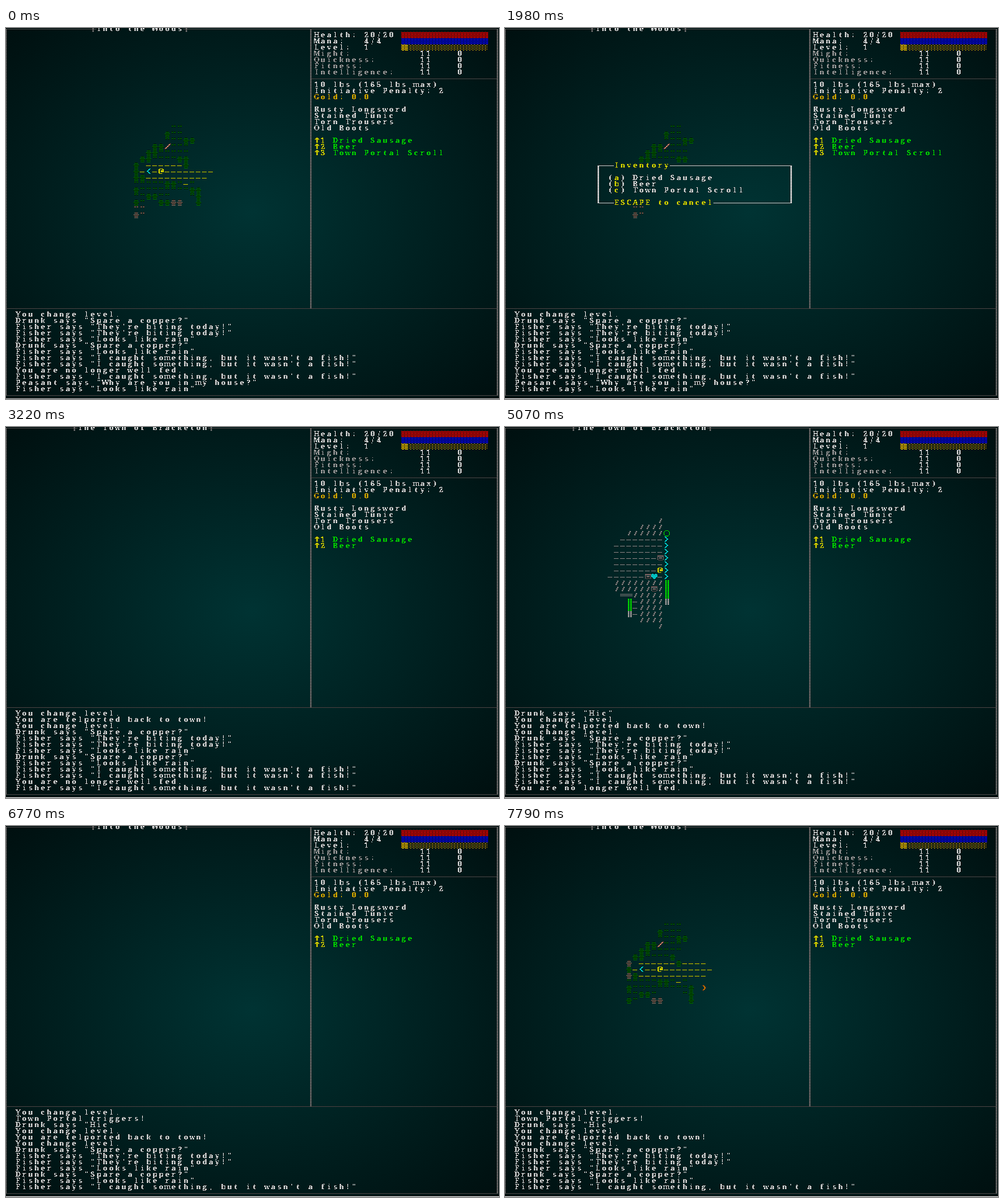
Write an HTML page with a canvas that moves like this. It is 634 px wide and 478 px high and loops after 8000 ms.

```html
<!DOCTYPE html>
<html lang="en">
<head>
<meta charset="utf-8">
<title>Terminal roguelike</title>
<style>
  html, body { margin: 0; width: 100%; height: 100%; overflow: hidden; background: #000f0f; }
  canvas { display: block; width: 634px; height: 478px; }
</style>
</head>
<body>
<canvas id="stage" width="634" height="478"></canvas>
<script>
const W = 634, H = 478, CELL = 8, LOOP = 8000;
const screen = document.getElementById('stage').getContext('2d');
const layer = document.createElement('canvas');
layer.width = W;
layer.height = H;
const ctx = layer.getContext('2d', { willReadFrequently: true });

const WHITE = '#fff', YELLOW = '#ff0', GOLD = '#ffd700', GREEN = '#0f0', CYAN = '#0ff';
const FRAME = '#999', LIGHT = '#ccc', LEAF = '#008000', BROWN = '#8c8078';

const colX = c => 4 + CELL * c;
const rowY = r => 5 + CELL * r;

// Newest message first; each scene starts further up the list.
const caught = 'Fisher says "I caught something, but it wasn\'t a fish!"';
const rain = 'Fisher says "Looks like rain"';
const biting = 'Fisher says "They\'re biting today!"';
const copper = 'Drunk says "Spare a copper?"';
const level = 'You change level.';
const LOG = [
  level, 'Town Portal triggers!', 'Drunk says "Hic"', level,
  'You are telported back to town!', level, copper, biting, biting, rain,
  copper, rain, caught, caught, 'You are no longer well fed.', caught,
  'Peasant says "Why are you in my house?"', rain
];
const ITEMS = ['Dried Sausage', 'Beer', 'Town Portal Scroll'];

const woodsStart = { col: 20, row: 15, tiles: [
  '      ""',
  '     T""',
  '     """TT',
  '   TT/"""',
  '  TT"""""',
  ' TT""""TT',
  'T ------T',
  'T-<-@--------',
  'TT----------',
  '"""""TT"-"',
  'T""""""""TT',
  '""TT""   "T',
  'T"  TTtt  T',
  '\'\'',
  't\''
] };
const woodsBack = { ...woodsStart, tiles: woodsStart.tiles.slice(0, 14) };
const woodsEast = { col: 19, row: 15, tiles: [
  '      """',
  '     T"""',
  '     """TT',
  '   TT/"""',
  '  TT"""""',
  ' TT""""T',
  't ------T----',
  'T-<--@--------',
  'tT-----------',
  '"""""TT"-"',
  'T"""""""""T )',
  '""TT"    "T',
  'T"  tt    T'
] };
const townArrive = { col: 15, row: 14, tiles: [
  '        ;',
  '     ;;;;O',
  '   ......>',
  '  .......>',
  '  .......>',
  '  .....N.>',
  '  .......>',
  ' ........>',
  '.......H@>',
  ' ;;;;;NN;#',
  ' ;;;;;;;;#',
  '  ==;;;;;#',
  '   #.;;;;#',
  '   #.;;;;',
  '   #.;;;;',
  '     ;;;;',
  '        ;'
] };
const townStep = { col: 16, row: 14, tiles: [
  '        ;',
  '     ;;;;',
  '   ;;;;;;O',
  '  .......>',
  ' ........>',
  ' ........>',
  ' .......N>',
  ' ........>',
  ' .......@>',
  '......NH.>',
  ' ;;;;;;;;#',
  ' ;;;;;;N;#',
  '  ==;;;;;#',
  '   #.;;;;%',
  '   #.;;;;',
  '   %.;;;;',
  '     ;;;;',
  '        ;'
] };

const WOODS = 'Into the Woods', TOWN = 'The Town of Bracketon';
const SCENES = [
  { at: 0, title: WOODS, map: woodsStart, log: 5, items: 3, edge: '#999' },
  { at: 200, title: WOODS, map: woodsStart, log: 5, items: 3 },
  { at: 1980, title: WOODS, map: woodsStart, log: 5, items: 3, menu: true },
  { at: 3220, title: TOWN, log: 3, items: 2 },
  { at: 3300, title: TOWN, map: townArrive, log: 3, items: 2 },
  { at: 5070, title: TOWN, map: townStep, log: 2, items: 2 },
  { at: 6770, title: WOODS, log: 0, items: 2 },
  { at: 6850, title: WOODS, map: woodsBack, log: 0, items: 2 },
  { at: 7790, title: WOODS, map: woodsEast, log: 0, items: 2 }
];

function text(c, r, str, color) {
  ctx.fillStyle = color;
  [...str].forEach((ch, i) => ctx.fillText(ch, colX(c + i) + 3.5, rowY(r) + 7));
}

function rects(c, r, color, ...list) {
  ctx.fillStyle = color;
  for (const [x, y, w, h] of list) ctx.fillRect(colX(c) + x, rowY(r) + y, w, h);
}

function clearCells(c, r, w, h) {
  ctx.clearRect(colX(c), rowY(r), w * CELL, h * CELL);
}

function hLine(c0, c1, r, color) {
  rects(c0, r, color, [3, 4, (c1 - c0) * CELL + 2, 1]);
}

function vLine(c, r0, r1, color) {
  rects(c, r0, color, [3, 4, 2, (r1 - r0) * CELL + 1]);
}

function box(c0, r0, c1, r1, color) {
  for (const r of [r0, r1]) hLine(c0, c1, r, color);
  for (const c of [c0, c1]) vLine(c, r0, r1, color);
}

function shade(c, r, n, dense, color) {
  ctx.fillStyle = color;
  for (let y = 0; y < CELL; y++) {
    for (let x = 0; x < n * CELL; x++) {
      const dot = y % 2 ? x % 4 === 0 : x % 4 === 2;
      if (dot !== dense) ctx.fillRect(colX(c) + x, rowY(r) + y, 1, 1);
    }
  }
}

// A tile painter made of a colour and a few rectangles inside the cell.
const tile = (color, ...list) => (c, r) => rects(c, r, color, ...list);
const tree = color => tile(color, [2, 0, 3, 3], [1, 1, 5, 1], [0, 3, 7, 2], [1, 5, 5, 1], [2, 6, 3, 1], [1, 7, 5, 1]);
const grass = color => tile(color, [1, 0, 2, 3], [4, 0, 2, 3]);
const dash = color => tile(color, [0, 4, 6, 1]);
const wall = color => tile(color, [2, 0, 2, 8], [5, 0, 2, 8]);
const arrow = tile(YELLOW, [3, 0, 2, 7], [2, 1, 4, 1], [1, 2, 6, 1]);

// One two-pixel step per row, placed by stepX.
const steps = (color, stepX) => (c, r) => {
  for (let y = 0; y < 7; y++) rects(c, r, color, [stepX(y), y, 2, 1]);
};
const bend = y => Math.min(y, 6 - y);

function ring(c, r) {
  ctx.strokeStyle = GREEN;
  ctx.lineWidth = 1.2;
  ctx.beginPath();
  ctx.arc(colX(c) + 4, rowY(r) + 4, 3.6, 0, 7);
  ctx.stroke();
}

const TILES = {
  T: tree(LEAF), t: tree(BROWN), '"': grass(LEAF), "'": grass(BROWN),
  '-': dash(YELLOW), '.': dash(LIGHT),
  ';': tile('#aaa', [4, 1, 2, 2], [3, 3, 2, 2], [2, 5, 2, 2]),
  '<': steps(CYAN, y => 4 - bend(y)),
  '>': steps(CYAN, y => 1 + bend(y)),
  ')': steps('#ffa500', y => 2 + Math.min(2, bend(y))),
  '/': steps('#ffb09c', y => 6 - y),
  '@': tile(YELLOW, [1, 0, 5, 1], [0, 1, 2, 5], [5, 1, 2, 1], [3, 2, 4, 3], [1, 6, 4, 1]),
  '#': wall(GREEN), '%': wall(LIGHT), O: ring,
  '=': tile(LIGHT, [0, 2, 8, 1], [0, 4, 8, 1]),
  H: tile(CYAN, [1, 0, 2, 1], [5, 0, 2, 1], [0, 1, 8, 3], [1, 4, 6, 1], [2, 5, 4, 1], [3, 6, 2, 1]),
  N: tile('#a89898', [0, 0, 8, 2], [0, 2, 1, 4], [7, 2, 1, 4], [2, 3, 4, 2], [1, 6, 6, 1])
};

function drawMap({ col, row, tiles }) {
  tiles.forEach((line, y) => [...line].forEach((ch, x) => {
    if (TILES[ch]) TILES[ch](col + x, row + y);
  }));
}

function drawFrame(title) {
  box(-1, -1, 78, 58, FRAME);
  hLine(-1, 78, 44, FRAME);
  hLine(48, 78, 7, FRAME);
  vLine(48, -1, 44, FRAME);
  const c = 21 - Math.floor(title.length / 2), end = c + title.length;
  clearCells(c, -1, title.length, 1);
  for (const side of [c - 1, end]) rects(side, -1, FRAME, [3, 0, 2, 8]);
  text(c, -1, title, WHITE);
}

function drawStats(count) {
  text(49, 0, 'Health: 20/20', WHITE);
  text(49, 1, 'Mana:   4/4', WHITE);
  text(49, 2, 'Level:  1', WHITE);
  shade(63, 0, 14, true, '#f00');
  shade(63, 1, 14, true, '#00f');
  shade(63, 2, 1, true, GOLD);
  shade(64, 2, 13, false, GOLD);
  ['Might:', 'Quickness:', 'Fitness:', 'Intelligence:'].forEach((name, i) => {
    text(49, 3 + i, name, LIGHT);
    text(66, 3 + i, '11', WHITE);
    text(72, 3 + i, '0', WHITE);
  });
  text(49, 8, '10 lbs (165 lbs max)', WHITE);
  text(49, 9, 'Initiative Penalty: 2', WHITE);
  text(49, 10, 'Gold: 0.0', GOLD);
  ['Rusty Longsword', 'Stained Tunic', 'Torn Trousers', 'Old Boots']
    .forEach((name, i) => text(49, 12 + i, name, WHITE));
  ITEMS.slice(0, count).forEach((name, i) => {
    arrow(49, 17 + i);
    text(50, 17 + i, String(i + 1), YELLOW);
    text(52, 17 + i, name, GREEN);
  });
}

function drawMenu() {
  clearCells(14, 21, 32, 7);
  box(14, 21, 45, 27, WHITE);
  for (const [r, label] of [[21, 'Inventory'], [27, 'ESCAPE to cancel']]) {
    clearCells(17, r, label.length, 1);
    text(17, r, label, YELLOW);
  }
  ITEMS.forEach((name, i) => {
    text(16, 23 + i, '( )', WHITE);
    text(17, 23 + i, 'abc'[i], YELLOW);
    text(20, 23 + i, name, WHITE);
  });
}

// Harden soft edges, then darken lit pixels by alternating amounts per row.
function scanlines() {
  const img = ctx.getImageData(0, 0, W, H), d = img.data;
  for (let i = 0; i < d.length; i += 4) {
    const cut = Math.floor(i / 4 / W) % 2 ? 96 : 32;
    for (let k = 0; k < 3; k++) d[i + k] -= cut;
    d[i + 3] = d[i + 3] > 100 ? 255 : 0;
  }
  ctx.putImageData(img, 0, 0);
}

function drawGlow() {
  screen.save();
  screen.translate(316, 237);
  screen.scale(640, 480);
  const glow = screen.createRadialGradient(0, 0, 0, 0, 0, 1);
  glow.addColorStop(0, 'rgb(0,51,51)');
  glow.addColorStop(1, '#000');
  screen.fillStyle = glow;
  screen.fillRect(-1, -1, 2, 2);
  screen.restore();
}

function draw(scene) {
  ctx.clearRect(0, 0, W, H);
  ctx.font = 'bold 9.5px "Noto Serif", serif';
  ctx.textAlign = 'center';
  drawFrame(scene.title);
  drawStats(scene.items);
  LOG.slice(scene.log, scene.log + 13).forEach((line, i) => text(1, 45 + i, line, WHITE));
  if (scene.map) drawMap(scene.map);
  if (scene.menu) drawMenu();
  scanlines();
  drawGlow();
  screen.drawImage(layer, 0, 0);
  screen.fillStyle = scene.edge || '#ccc';
  screen.fillRect(0, 477, W, 1);
}

let shown, start;
function tick(now) {
  start ??= now;
  const t = (now - start) % LOOP;
  const scene = SCENES.findLast(s => s.at <= t);
  if (scene !== shown) draw(shown = scene);
  requestAnimationFrame(tick);
}
draw(shown = SCENES[0]);
requestAnimationFrame(tick);
</script>
</body>
</html>
```
